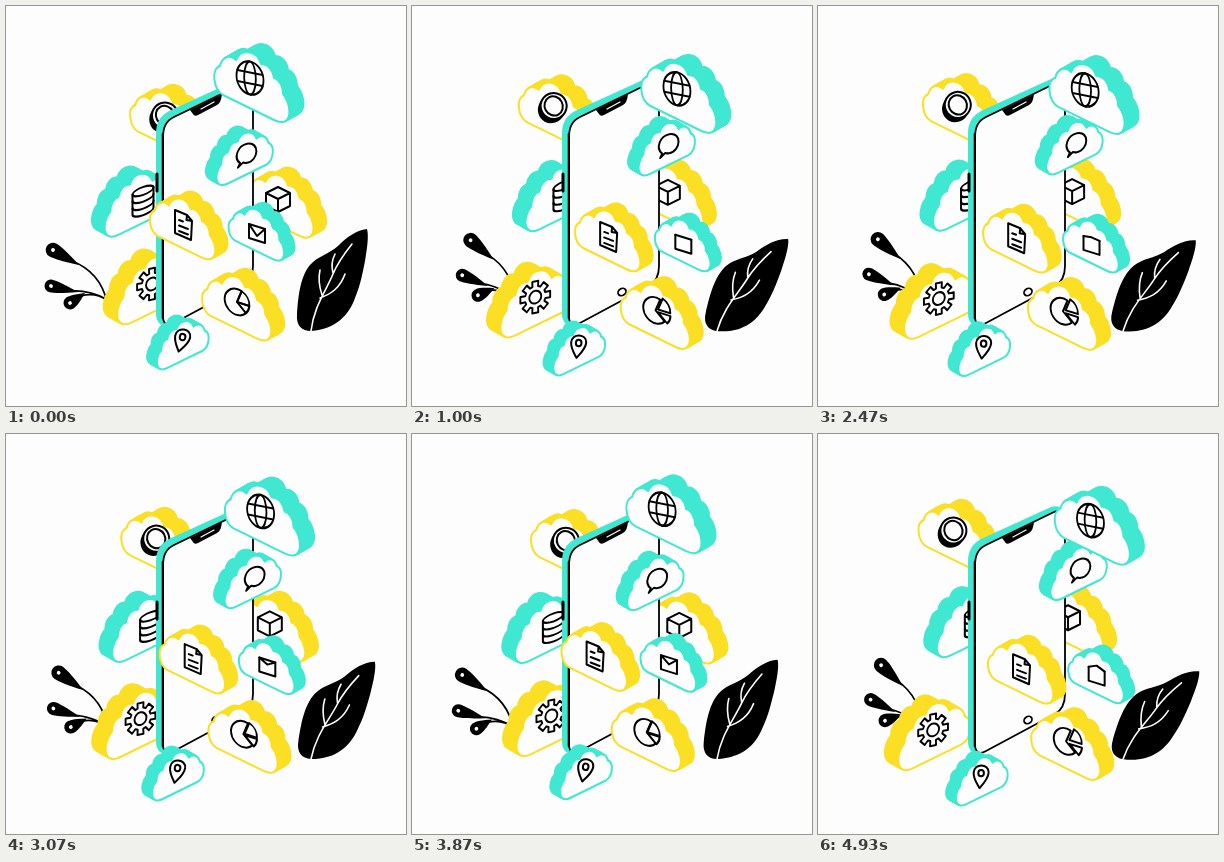
An HTML page with a canvas for the animation above (4990 ms loop, 400 px wide and 400 px high).

```html
<!DOCTYPE html>
<html lang="en">
<head>
<meta charset="utf-8">
<title>Clouds around a phone</title>
<style>
html, body { margin: 0; width: 100%; height: 100%; overflow: hidden; background: #fdfdfd; }
canvas { display: block; width: 100vw; height: 100vh; }
</style>
</head>
<body>
<canvas id="stage"></canvas>
<script>
const LOOP = 4990, STEP = 66.6, SWING = 1785, REACH = 1670;
const PAPER = '#fdfdfd', INK = '#000', MINT = '#40e8d2', SUN = '#fbdf24';
const TAU = Math.PI * 2;

const canvas = document.getElementById('stage');
const c = canvas.getContext('2d');
const ratio = Math.max(1, window.devicePixelRatio || 1);
canvas.width = canvas.height = 400 * ratio;

const cloudFace = new Path2D(
  'M-27 17C-37 11 -39 -9 -30 -12C-28 -21 -20 -24 -14 -18C-9 -30 7 -28 11 -14' +
  'C18 -14 23 -8 24 0C30 2 33 9 33 16C39 23 41 35 38 40C36 45 30 45 24 42Z');

function stroke(d, width = 2, color = INK) {
  c.lineWidth = width;
  c.strokeStyle = color;
  c.stroke(new Path2D(d));
}

function fill(d, color) {
  c.fillStyle = color;
  c.fill(new Path2D(d));
}

function ellipse(x, y, rx, ry, turn = 0) {
  c.beginPath();
  c.ellipse(x, y, rx, ry, turn, 0, TAU);
}

function line(...points) {
  c.beginPath();
  points.forEach(([x, y]) => c.lineTo(x, y));
}

function around(x, y, degrees, draw) {
  c.save();
  c.translate(x, y);
  c.rotate(degrees * Math.PI / 180);
  c.translate(-x, -y);
  draw();
  c.restore();
}

function wedge(from, to, shift) {
  const mid = (from + to) / 2;
  const x = Math.cos(mid) * shift, y = Math.sin(mid) * shift;
  c.beginPath();
  c.moveTo(x, y);
  c.arc(x, y, 13, from, to);
  c.closePath();
  c.stroke();
}

const icons = {
  globe() {
    c.transform(0.9, 0.18, 0, 1.1, 0, 0);
    ellipse(0, 0, 15, 15); c.stroke();
    ellipse(0, 0, 6.5, 15); c.stroke();
    stroke('M-14 -5H14M-14 5H14', 1.8);
  },
  coin() {
    c.fillStyle = INK;
    ellipse(-1, 1.5, 13.5, 14.5, 0.5); c.fill();
    c.fillStyle = PAPER;
    ellipse(1, -1.5, 13, 13, 0.5); c.fill(); c.stroke();
    ellipse(1, -1.5, 9, 9.8, -0.5); c.stroke();
  },
  box() {
    stroke('M0 -12L12 -6V7L0 13L-12 7V-6ZM-12 -6L0 0L12 -6M0 0V13');
  },
  doc() {
    stroke('M-8 -15L4 -10L9 -4L8 15L-8 8ZM4 -10L3.5 -5L9 -4');
    stroke('M-4 -5L0 -3.5M-4 0.5L5 4M-4 6L5 9.5', 1.9);
  },
  mail(k) {
    const apex = 2 - 16 * k;
    stroke('M-8 -10V4L8 9V-5');
    line([-8, -10], [0, apex], [8, -5]);
    if (apex > -7.5) c.closePath();
    c.stroke();
  },
  pie(k) {
    c.transform(0.95, 0.25, 0, 1, 0, 0);
    wedge(0.75, 5.1, 0);
    wedge(-1.18, 0.05, 5 * k);
    wedge(0.05, 0.75, 5 * k);
  },
  chat() {
    c.transform(1, -0.2, 0, 1, 0, 0);
    stroke('M-6 6C-13 -1 -8 -12 1 -12C14 -12 13 7 1 7C-1 7 -2 6.5 -3 6L-8 10Z');
  },
  data() {
    c.transform(1, -0.35, 0, 1, 0, 0);
    ellipse(0, -10, 10.5, 4); c.stroke();
    stroke('M-10.5 -10V10C-10.5 15.5 10.5 15.5 10.5 10V-10');
    stroke('M-10.5 -3.5C-10.5 2 10.5 2 10.5 -3.5M-10.5 3.5C-10.5 9 10.5 9 10.5 3.5');
  },
  gear() {
    c.transform(0.95, -0.2, 0, 1, 0, 0);
    c.beginPath();
    for (let i = 0; i < 8; i++) {
      const a = i * TAU / 8;
      [[-0.27, 11], [-0.2, 16], [0.2, 16], [0.27, 11]].forEach(([turn, r]) =>
        c.lineTo(Math.sin(a + turn) * r, -Math.cos(a + turn) * r));
    }
    c.closePath();
    c.stroke();
    ellipse(0, 0, 6.3, 6.3); c.stroke();
  },
  pin(k) {
    c.rotate(0.2 * (1 - k));
    stroke('M-1 12C-4 7 -7.5 3 -7.5 -3C-7.5 -13 7.5 -13 7.5 -4C7.5 2 3 7 -1 12Z');
    ellipse(0, -3, 2.8, 3.2); c.stroke();
  }
};

// icon, colour, facing, scale, x, y, travel x, travel y, icon offset x, y
const back = [
  ['coin', SUN, 1, 0.92, 157, 110, -29, -16, 1, 1],
  ['data', MINT, -1, 0.9, 134, 191, 25, -9, 3, 4],
  ['box', SUN, 1, 0.9, 272, 192, -27, -12, 0, 1],
  ['gear', SUN, -1, 0.96, 149, 276, -38, 22, -3, 2]
];
const front = [
  ['pie', SUN, 1, 0.92, 229, 294, 21, 14, 2, 2],
  ['doc', SUN, 1, 0.87, 175, 215, 32, 20, 2, 4],
  ['mail', MINT, 1, 0.74, 249, 222, 34, 18, 2, 6],
  ['chat', MINT, -1, 0.75, 240, 146, 27, -16, 0, 4],
  ['globe', MINT, 1, 1, 244, 72, 35, 18, 0, 0],
  ['pin', MINT, -1, 0.69, 178, 333, -16, 10, -2, 1]
];

function drawCloud([icon, color, facing, scale, x, y, dx, dy, ix, iy], k) {
  c.save();
  c.translate(x + dx * k, y + dy * k);
  c.save();
  c.scale(facing * scale, scale);
  c.lineWidth = 2 / scale;
  c.strokeStyle = c.fillStyle = color;
  for (let i = 14; i > 0; i--) {
    c.save();
    c.translate(i, -i * 8 / 14);
    c.fill(cloudFace);
    c.stroke(cloudFace);
    c.restore();
  }
  c.fillStyle = PAPER;
  c.fill(cloudFace);
  c.stroke(cloudFace);
  c.restore();
  c.translate(ix, iy);
  c.lineWidth = 2;
  c.strokeStyle = INK;
  icons[icon](k);
  c.restore();
}

function drawPhone() {
  fill('M150 128C150 117 154 110 163 105L233 73C239 71 244 73 246 79L170 200L160 320C154 320 150 315 150 308Z', MINT);
  const face = 'M157 132C157 121 160 115 168 111L236 78C243 75 247 78 247 86V260' +
    'C247 269 244 276 237 280L168 317C161 321 157 318 157 310Z';
  fill(face, PAPER);
  stroke(face, 1.8);
  stroke('M156.8 128V312', 2.2);
  fill('M184 104L187 108C188 110 190 110 192 109L211 99C214 97 215 95 216 88Z', INK);
  stroke('M195 103L208 96', 1.2, PAPER);
  stroke('M151 168V185', 3);
  c.lineWidth = 1.8;
  c.strokeStyle = INK;
  ellipse(210, 286, 4.2, 3.4, -0.6);
  c.stroke();
}

function drawLeaf() {
  fill('M305 325C296 325 290 320 291 308C292 296 293 272 304 259C312 250 323 248 332 240' +
    'C340 232 350 224 361 223C363 230 361 243 359 255C356 270 354 280 349 292C343 309 330 323 305 325Z', INK);
  stroke('M305 325C308 300 320 285 327 268C332 256 338 248 346 238M316 289C313 280 312 273 314 264' +
    'M327 267C325 260 326 254 329 248M314 292C325 288 334 282 339 268', 1.6, PAPER);
}

function drawBud(x, y, tailX, tailY, r) {
  const length = Math.hypot(tailX - x, tailY - y);
  c.save();
  c.translate(x, y);
  c.rotate(Math.atan2(tailY - y, tailX - x));
  c.beginPath();
  c.moveTo(length, 0);
  c.bezierCurveTo(length * 0.5, -r * 0.7, r * 0.6, -r, 0, -r);
  c.arc(0, 0, r, -TAU / 4, TAU / 4, true);
  c.bezierCurveTo(r * 0.6, r, length * 0.5, r * 0.7, length, 0);
  c.fillStyle = INK;
  c.fill();
  ellipse(0, 0, 1.9, 1.9);
  c.fillStyle = PAPER;
  c.fill();
  c.restore();
}

function drawSprig() {
  stroke('M66 255C84 262 96 274 101 296M66 285C77 284 92 288 101 294M75 290C82 288 92 288 101 294', 1.7);
  drawBud(47, 244, 73, 259, 7.3);
  drawBud(45, 280, 72, 286, 6.5);
  drawBud(64, 297, 79, 287, 6.5);
}

function draw(time) {
  const t = Math.floor((time % LOOP) / STEP) * STEP;
  const k = (SWING - Math.abs(SWING - t % (2 * SWING))) / REACH;
  c.setTransform(ratio, 0, 0, ratio, 0, 0);
  c.lineCap = c.lineJoin = 'round';
  c.fillStyle = PAPER;
  c.fillRect(0, 0, 400, 400);
  around(108, 304, 17 * k, drawSprig);
  back.forEach(cloud => drawCloud(cloud, k));
  drawPhone();
  around(304, 325, 15 * k, drawLeaf);
  front.forEach(cloud => drawCloud(cloud, k));
}

const start = performance.now();
function tick() {
  draw(performance.now() - start);
  requestAnimationFrame(tick);
}
tick();
</script>
</body>
</html>
```
